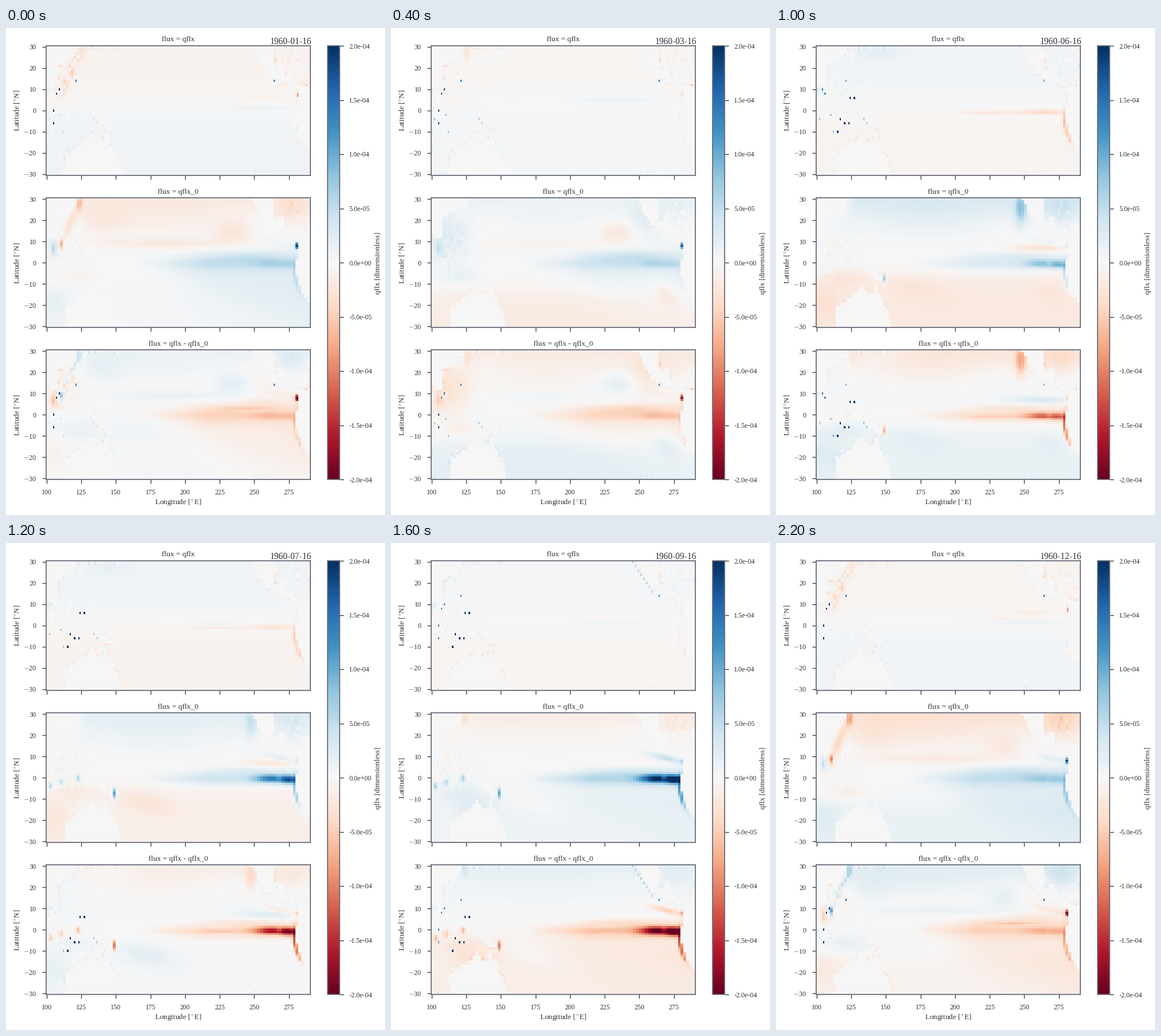
Animation of 660 by 849 pixels, one loop 2400 ms. Source, as a matplotlib script:

```python
import numpy as np
import matplotlib.pyplot as plt
from matplotlib.animation import FuncAnimation
from matplotlib.path import Path

W, H, DPI = 660, 849, 72  # at 72 dpi one point is one pixel
INK, FRAME = "#303036", "#686c7a"
plt.rcParams.update({
    "font.family": "Liberation Serif", "mathtext.fontset": "cm",
    "text.color": INK, "axes.labelcolor": INK, "axes.edgecolor": FRAME,
    "axes.linewidth": 1.8,
})

lons, lats = np.arange(100, 291), np.arange(30, -31, -1)
lon, lat = np.meshgrid(lons // 2 * 2 + 0.5, lats)
lat2 = lat // 2 * 2
rng = np.random.default_rng(4)
grain = rng.normal(size=(31, 96)).repeat(2, 0)[:61].repeat(2, 1)[:, :191]


def blob(x, y, sx, sy, slope=0.0):
    dx = lon - x
    return np.exp(-(dx / sx) ** 2 - ((lat - y - slope * dx) / sy) ** 2)


def step(v):
    return 1 / (1 + np.exp(-v))


def inside(*points):
    cells = np.column_stack([lon.ravel(), lat2.ravel()])
    return Path(points).contains_points(cells).reshape(lon.shape)


asia = inside((98, 32), (122, 32), (120, 26), (116, 23), (108, 21),
              (107, 17), (108, 12), (104, 10), (101, 13), (98, 13))
australia = inside((114, -33), (114, -22), (125, -16), (133, -11.5), (138, -16),
                   (141, -16), (142, -10), (148, -20), (154, -28), (153, -33))
new_guinea = inside((132, -1), (138, -2), (147, -8), (143, -9), (138, -7))
north_america = inside((247, 32), (253, 22), (260, 16.5), (264, 15), (273, 13),
                       (280, 9), (277, 15.5), (272, 16), (272, 21), (264, 19),
                       (264, 32))
south_america = inside((282, 10.5), (292, 10.5), (292, -19), (288.5, -18.5),
                       (284, -15), (280, -6), (279.5, 0), (282, 4), (282, 8))
land = asia | australia | new_guinea | north_america | south_america
sea = ~land
near = np.zeros_like(land)
for shift, axis in ((2, 0), (-2, 0), (2, 1), (-2, 1)):
    near |= np.roll(land, shift, axis)
shore = near & sea

# Ocean regions
east = np.clip(lon - 165, 0, None)
ramp = np.clip(east / 50, 0, 1)
open_north = step((lon - 124) / 1.5) * np.exp(-((30 - lat) / 8) ** 2)
tongue = ramp * np.exp(-((lat + 0.5) / (1.5 + 1.8 * ramp)) ** 2)
reach = np.where(lat > 0, 2.5 + 0.03 * east, 2.5 + 0.22 * east)
fan = ramp * np.exp(-(lat / reach) ** 2)
peru_lon = 279 + 0.035 * np.clip(-lat - 4, 0, None) ** 2
peru = np.exp(-((lon - peru_lon) / 1.5) ** 2 - ((lat + 7) / 7) ** 2)
galapagos = 1 - 0.5 * blob(267.5, 0, 1.2, 1.5)
china_sea = blob(116, 17, 7, 5, 1.3)
speckle = grain * (blob(114, 4, 16, 14) + blob(278, 22, 12, 10))

# Single bright cells: strength, peak month, sharpness, places
SITES = [
    (25, 11.5, 0.7, [(105, 0), (105, -6), (107, 8), (109, 10)]),
    (16, 0, 0.2, [(121, 14), (264, 14)]),
    (29, 6.5, 2, [(115, -10), (117, -4), (120, -6), (123, -6), (127, 6), (124, 6)]),
    (9, 4, 0.6, [(102, -4), (112, -10), (136, -6), (110, -2), (134, -4)]),
    (17, 4.5, 12, [(104, 10), (106, 8)]),
    (8, 8.7, 9, [(245 + 2 * k, 30 - 2 * k) for k in range(8)]),
    (-8, 11.5, 4, [(281, 8), (281, 7)]),
    (-5, 2, 0.6, [(287, 12), (288, 12)]),
]


def fields(month):
    """Total flux, its seasonal part and their difference."""
    def wave(peak, cycles=1):
        return np.cos(2 * np.pi * cycles * (month - peak) / 12)

    def pulse(peak, sharp):
        return ((1 + wave(peak)) / 2) ** sharp

    cold = pulse(7.5, 3)  # late-summer cold tongue

    base = 2.9 * open_north * wave(4.2) + 1.4 * blob(180, 20, 55, 8) * wave(4.5)
    base -= 1.8 * blob(188, 9, 50, 2.4) * pulse(0, 2)
    base -= 2.6 * blob(234, 14.5, 13, 5) * pulse(0.8, 1.5)
    base -= 1.3 * blob(140, 20, 16, 7) * pulse(11.5, 3)
    base -= 7 * blob(123.5, 28, 2, 4) * pulse(10.5, 2)
    base -= 4 * china_sea * pulse(11, 3)
    base -= 9 * blob(110, 8.5, 1.2, 2) * pulse(11.2, 6)
    base += 5.5 * blob(105, 6.5, 2.2, 3.5) * pulse(0, 2)
    base += 2.6 * blob(111, 12, 15, 13) * pulse(2, 4)
    base += 2 * blob(255, 20, 12, 8) * pulse(2.3, 4)
    base += 6.5 * blob(247, 25, 4, 7) * pulse(5, 10)
    base -= blob(276, 25, 12, 8) * (0.2 + 2.4 * wave(10.5))

    base += tongue * (2.2 + 2.6 * cold) + 2.5 * fan * pulse(11.5, 1)
    base += galapagos * blob(262, -0.5, 12, 1.8) * (2 + 14 * cold)
    base += galapagos * blob(275, -1, 6, 1.8) * (1 + 17 * cold)
    base += peru * (6 + 5.5 * wave(8))
    base += 1.6 * blob(245, 3, 30, 2) + 1.3 * blob(242, 4, 40, 5) * pulse(2, 3)
    base -= 3 * blob(262, 7, 22, 1.8) * pulse(4.8, 3)
    base += blob(270, 9, 14, 1.4, -0.15) * (0.5 + 4.5 * pulse(8.3, 2))
    base += blob(280.5, 8, 1.3, 1.3) * (3 + 19 * pulse(0.5, 2))

    edge = -9 - 5 * wave(1)
    base -= step((edge - lat) / 2.5) * (0.3 + 2.1 * wave(3.7))
    base -= 2.3 * blob(268, -14, 9, 5, -0.3) * pulse(3, 4)
    base -= 1.3 * blob(105, -19, 11, 9) * wave(5.5)
    base += 1.4 * blob(122, -7, 14, 4) * wave(2.2, 2)
    base += 1.5 * blob(130, -13, 14, 4) * pulse(8, 4)
    base -= 1.8 * blob(172, -12, 20, 5, -0.15) * pulse(6.5, 4)
    base += 13 * blob(148.5, -7.5, 1.2, 2.4) * pulse(6.7, 2.5)
    for x, y in ((122.5, -0.3), (102.5, -4), (110, -2)):
        base += 9 * blob(x, y, 1.6, 1.6) * pulse(7, 6)
    base += 0.5 * speckle

    flux = -0.7 * np.tanh((lat - 3) / 8) * wave(0)
    flux += 1.3 * blob(145, 28, 18, 5) * pulse(4.8, 4)
    flux -= (4 * blob(264, -0.7, 15, 1) + 2 * blob(225, -0.8, 22, 0.9)) * pulse(4.8, 4)
    flux -= 1.4 * (blob(240, 3, 20, 0.9) + blob(255, 6, 16, 1.3)) * pulse(10.7, 3)
    flux += 1.7 * blob(252, 1.6, 24, 0.9) * pulse(10.5, 2)
    flux += 1.6 * (blob(222, 1.5, 20, 0.9) + 0.6 * blob(228, -2, 18, 0.8)) * pulse(7, 4)
    flux += 1.2 * blob(235, 5, 32, 2) * pulse(2, 4)
    flux -= peru * (0.6 + 6 * pulse(5, 4))
    flux -= 2.8 * blob(125, 28, 2, 4) * pulse(2, 1)
    flux -= 2.2 * china_sea * (1 + grain) * pulse(11.5, 4)
    flux += grain * shore * 0.8 + 0.35 * speckle

    base, flux = base * sea, flux * sea
    for strength, peak, sharp, places in SITES:
        for x, y in places:
            flux[30 - y, x - 100] += strength * pulse(peak, sharp)
    return [f * 1e-5 for f in (flux, base, flux - base)]


fig = plt.figure(figsize=(W / DPI, H / DPI), dpi=DPI, facecolor="white")


def add_axes(left, top, width, height):
    return fig.add_axes([left / W, 1 - (top + height) / H, width / W, height / H])


def label(x, y, s, size, **kw):
    return fig.text(x / W, 1 - y / H, s, fontsize=size, **kw)


TICKS = dict(direction="out", length=7, width=1.3, color=INK, labelcolor=INK, labelsize=12)
UPRIGHT = dict(rotation=90, ha="center", va="center")
yticks = range(-30, 31, 10)
images = []
for i, name in enumerate(("qflx", "qflx_0", "qflx - qflx_0")):
    top = 31 + 265.2 * i
    ax = add_axes(69.5, top, 460.5, 225.7)
    images.append(ax.imshow(np.zeros(lon.shape), cmap="RdBu", vmin=-2e-4, vmax=2e-4,
                            extent=(99.5, 290.5, -30.5, 30.5), aspect="auto",
                            interpolation="nearest"))
    ax.set_xticks(range(100, 276, 25))
    ax.set_yticks(yticks, [f"$-${-v}" if v < 0 else str(v) for v in yticks])
    ax.tick_params(pad=10, labelbottom=i == 2, **TICKS)
    label(300, top - 7.6, f"flux = {name}", 13.4, ha="center")
    label(20, top + 113, r"Latitude [$^{\circ}$N]", 13.3, **UPRIGHT)
label(300, 831, r"Longitude [$^{\circ}$E]", 13.3, ha="center")
date = label(532, 27.6, "", 15.5, ha="right")

cax = add_axes(559.8, 31, 21.4, 756)
bar = fig.colorbar(images[0], cax=cax)
levels = range(-20, 21, 5)
bar.set_ticks([v / 1e5 for v in levels], labels=[f"{v / 1e5:.1e}" for v in levels])
cax.tick_params(pad=9, **TICKS)
bar.outline.set(edgecolor=FRAME, linewidth=1.8)
label(648.5, 409.5, "qflx [dimensionless]", 13.3, **UPRIGHT)


def update(month):
    for image, field in zip(images, fields(month)):
        image.set_data(field)
    date.set_text(f"1960-{month + 1:02d}-16")
    return [*images, date]


anim = FuncAnimation(fig, update, frames=12, interval=200, repeat=True)
plt.show()
```
